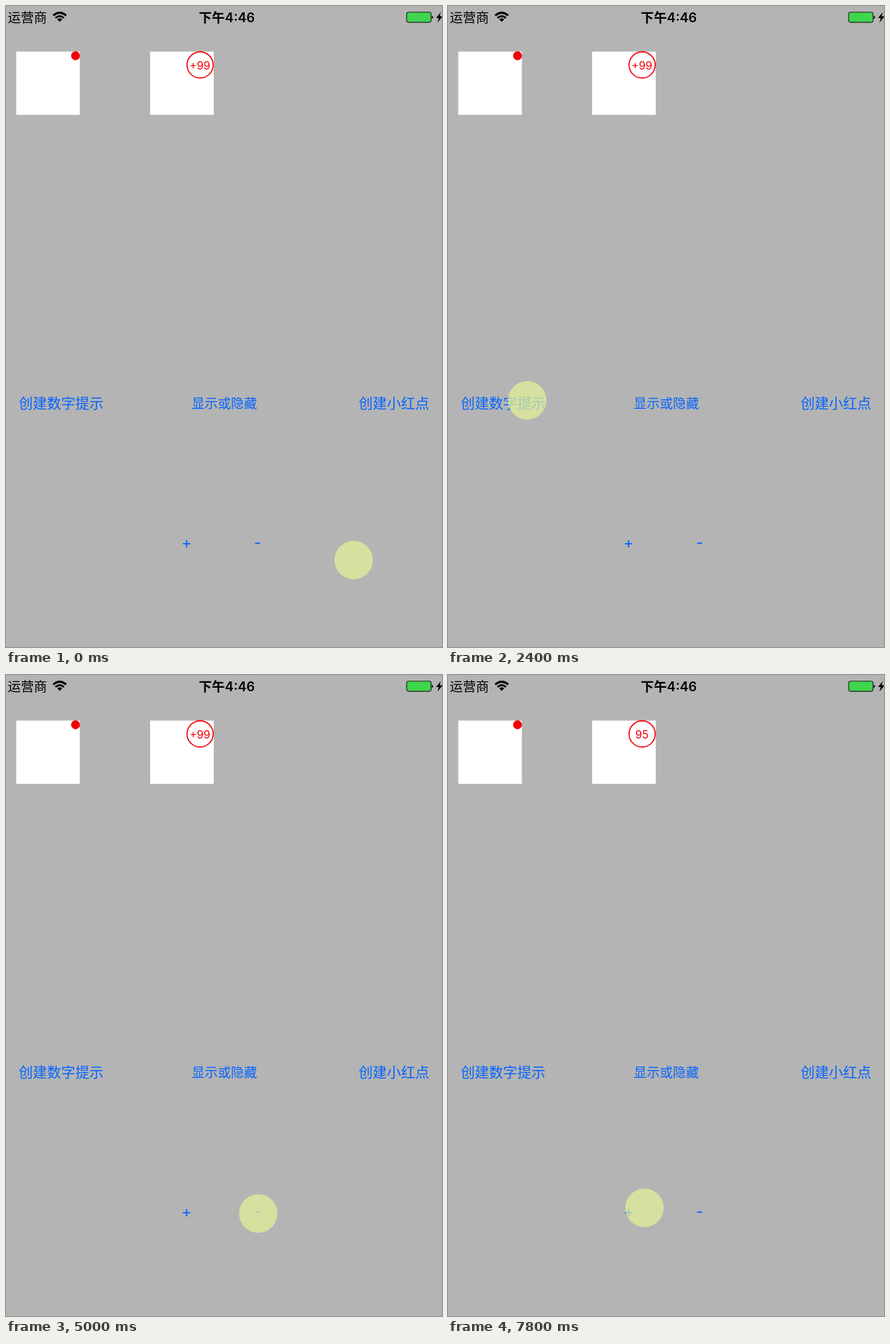
Write an HTML page that moves like this. It is 617x907 px and loops after 8000 ms.

```html
<!DOCTYPE html>
<html lang="zh-CN">
<head>
<meta charset="utf-8">
<title>Badge demo</title>
<style>
  html, body { margin: 0; width: 100%; height: 100%; overflow: hidden; background: #b4b4b4; }
  svg { display: block; width: 100vw; height: 100vh; }
  text { font-family: Inter, "Noto Sans CJK SC", "Noto Sans CJK", sans-serif; }
  .link { fill: #0464ff; font-size: 20px; }
  .mid { font-size: 18.5px; }
  .sign { font-size: 22px; text-anchor: middle; }
  .bar { font-size: 18.5px; }
  .clock { font-weight: 600; text-anchor: middle; }
  .count { fill: #f5000a; font-size: 15.5px; text-anchor: middle; }

  .touch, .strip, .minus { animation: 8s step-end infinite; }
  .touch { fill: rgba(228, 241, 152, .72); animation-name: touch; }
  .strip { animation-name: count; }
  .minus { animation-name: press; }

  /* one step is 200 ms = 2.5% */
  @keyframes touch {
    0% { transform: translate(492px, 784px); }
    2.5% { transform: translate(481px, 774px); }
    5% { transform: translate(430px, 716px); }
    7.5% { transform: translate(346px, 629px); }
    10% { transform: translate(262px, 565px); }
    12.5% { transform: translate(191px, 538px); }
    15% { transform: translate(112px, 557px); }
    17.5% { transform: translate(102px, 559px); }
    20% { transform: translate(100px, 559px); }
    25% { transform: translate(104px, 559px); }
    27.5% { transform: translate(109px, 558px); }
    30% { transform: translate(112px, 558px); }
    32.5% { transform: translate(146px, 575px); }
    35% { transform: translate(251px, 649px); }
    37.5% { transform: translate(301px, 729px); }
    40% { transform: translate(256px, 761px); }
    42.5% { transform: translate(254px, 757px); }
    45% { transform: translate(254px, 755px); }
    50% { transform: translate(253px, 754px); }
    55% { transform: translate(265px, 755px); }
    57.5% { transform: translate(305px, 758px); }
    60% { transform: translate(343px, 761px); }
    62.5% { transform: translate(357px, 762px); }
    65% { transform: translate(358px, 760px); }
    67.5% { transform: translate(358px, 758px); }
    92.5% { transform: translate(352px, 760px); }
    95% { transform: translate(318px, 758px); }
    97.5%, 100% { transform: translate(278px, 754px); }
  }
  @keyframes count {
    0% { transform: translateY(0); }
    75% { transform: translateY(-40px); }
    80% { transform: translateY(-80px); }
    82.5% { transform: translateY(-120px); }
    85% { transform: translateY(-160px); }
    87.5%, 100% { transform: translateY(-200px); }
  }
  @keyframes press {
    0% { opacity: 1; }
    75% { opacity: .2; }
    77.5% { opacity: 1; }
    80% { opacity: .2; }
    82.5% { opacity: 1; }
    85% { opacity: .2; }
    87.5% { opacity: 1; }
    90% { opacity: .15; }
    92.5%, 100% { opacity: 1; }
  }
</style>
</head>
<body>
<svg viewBox="0 0 617 907" preserveAspectRatio="none">
  <clipPath id="badge"><circle cx="274.7" cy="83.4" r="17.5"/></clipPath>

  <text class="bar" x="2.5" y="22.8">运营商</text>
  <g fill="none" stroke="#000" stroke-width="2.7">
    <path d="M66.8 13.4Q76 5.6 85.2 13.4"/>
    <path d="M70 17Q76 11.8 82 17"/>
  </g>
  <path d="M76 22.4L72.4 18.8Q76 16 79.6 18.8Z"/>
  <text class="bar clock" x="312.5" y="22.8">下午4:46</text>
  <rect x="567" y="8.7" width="34.5" height="14.4" rx="2.5" fill="#3fd54e" stroke="#222" stroke-width="1.1"/>
  <path d="M602.6 13.4q1.8 .6 1.8 2.5t-1.8 2.5z"/>
  <path d="M615.5 8.5L608.5 17H612.5L610.5 23.5L618 14.5H613.5Z"/>

  <path d="M14.5 64.5h90v89.6h-90zM204 64.5h90v89.6h-90z" fill="#fff"/>
  <circle cx="98.4" cy="70.4" r="6.3" fill="#f5000a"/>
  <circle cx="274.7" cy="83.4" r="18.5" fill="#fff" stroke="#f5000a" stroke-width="1.6"/>
  <g clip-path="url(#badge)">
    <g class="strip count">
      <text x="274.5" y="89.5">+99</text>
      <text x="274.5" y="129.5">99</text>
      <text x="274.5" y="169.5">98</text>
      <text x="274.5" y="209.5">97</text>
      <text x="274.5" y="249.5">96</text>
      <text x="274.5" y="289.5">95</text>
    </g>
  </g>

  <g class="link">
    <text x="18" y="569.7">创建数字提示</text>
    <text class="mid" x="262.7" y="569.2">显示或隐藏</text>
    <text x="499" y="569.7">创建小红点</text>
    <text class="sign" x="255.5" y="767">+</text>
    <text class="sign minus" x="356" y="767">-</text>
  </g>

  <circle class="touch" r="27.2"/>
</svg>
</body>
</html>
```
